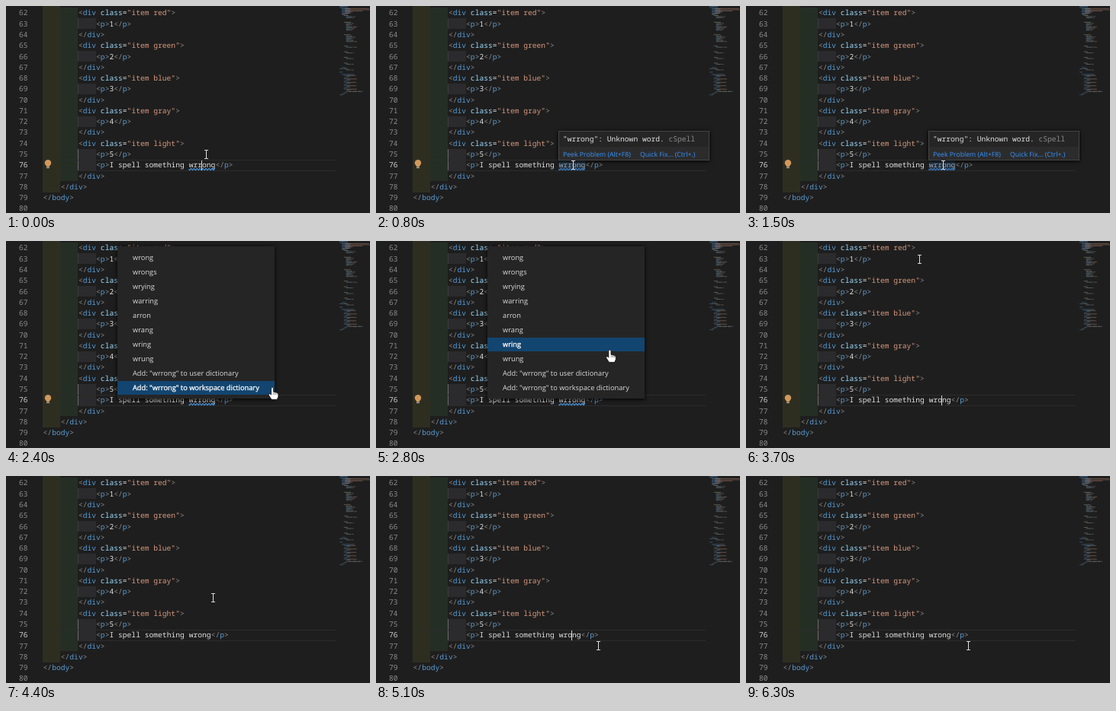
Animation of 477 by 272 pixels, one loop 6400 ms. Source, as an HTML page with a canvas:

```html
<!DOCTYPE html>
<html lang="en">
<head>
<meta charset="utf-8">
<title>Spell check quick fix</title>
<style>
  html, body { margin: 0; width: 100%; height: 100%; overflow: hidden; background: #1e1e1e; }
  canvas { display: block; }
</style>
</head>
<body>
<canvas width="477" height="272"></canvas>
<script>
const ctx = document.querySelector('canvas').getContext('2d');
const MONO = '500 9.65px "Noto Sans Mono", monospace';
const UI = '"Open Sans", "Noto Sans", sans-serif';
const LOOP = 6400, LEFT = 48.6, CHAR = 5.79, ROW = 14.28, FIRST = 62;
const HOVER_ON = 800, MENU_ON = 2200, FIXED = 3550, BULB_OFF = 4000;
const MENU = { x: 146, y: 7, w: 206, h: 200, top: 12.2, row: 19.05 };

const lines = ['red', 'green', 'blue', 'gray', 'light'].flatMap((name, i) => [
  `        <div class="item ${name}">`,
  `            <p>${i + 1}</p>`,
  '        </div>'
]);
lines.splice(14, 0, '');
lines.push('    </div>', '</body>', '');

const suggestions = ['wrong', 'wrongs', 'wrying', 'warring', 'arron', 'wrang', 'wring', 'wrung',
  'Add: "wrrong" to user dictionary', 'Add: "wrrong" to workspace dictionary'];

// time, x, y of the pointer
const path = [[0, 262, 195], [500, 258, 209], [1500, 258, 209], [1900, 375, 195], [2200, 375, 195],
  [2400, 349, 192], [2600, 349, 192], [3100, 228, 53], [3500, 227, 24], [3900, 227, 24],
  [4700, 291, 223], [LOOP, 291, 223]];

function pointerAt(t) {
  const i = path.findIndex(p => p[0] > t);
  const [t0, x0, y0] = path[i - 1], [t1, x1, y1] = path[i];
  const u = (t - t0) / (t1 - t0), e = u * u * (3 - 2 * u);
  return { x: x0 + (x1 - x0) * e, y: y0 + (y1 - y0) * e };
}

function rect(x, y, w, h, color) {
  ctx.fillStyle = color;
  ctx.fillRect(x, y, w, h);
}

function text(s, x, y, color, font = MONO) {
  ctx.font = font;
  ctx.fillStyle = color;
  ctx.fillText(s, x, y);
}

function eachToken(line, visit) {
  let inTag = false;
  for (const m of line.matchAll(/<\/?|>|"[^"]*"|=|\s+|[^<>"=\s]+/g)) {
    const s = m[0];
    if (s[0] === '<') inTag = true;
    const color = /^[<>]/.test(s) ? '#8a8a8a' : !inTag || s === '=' ? '#e0e0e0'
      : s[0] === '"' ? '#d6987e' : s === 'class' ? '#9cdcfe' : '#569cd6';
    if (s === '>') inTag = false;
    if (s.trim()) visit(s, m.index, color);
  }
}

function drawEditor(fixed) {
  rect(0, 0, 477, 272, '#1e1e1e');
  rect(48, 0, 23, 2, '#2e2e20');
  lines[14] = `            <p>I spell something ${fixed ? 'wrong' : 'wrrong'}</p>`;
  const tints = ['#2e2e20', '#252e25', '#2b2a2c'];
  lines.forEach((line, i) => {
    const y = 1.9 + i * ROW, top = Math.round(y), height = Math.round(y + ROW) - top;
    const depth = line.search(/\S|$/) / 4, current = i === 14;
    for (let d = 0; d < depth; d++) {
      const x = Math.floor(LEFT + d * 4 * CHAR);
      rect(x, top, d < 2 ? 23 : 24, height, tints[d]);
      if (d === 2) rect(x, top, 1, height, i > 12 ? '#686868' : '#3c3c3c');
    }
    if (current) {
      rect(49, top, 383, 1, '#2c2c2c');
      rect(49, top + height, 383, 1, '#2c2c2c');
    }
    text(FIRST + i, 17, y + 10.5, current ? '#d0d0d0' : '#8a8a8a');
    eachToken(line, (s, col, color) => text(s, LEFT + col * CHAR, y + 10.5, color));
  });
  if (!fixed) drawSquiggle(239.5, 274);
}

function drawSquiggle(from, to) {
  ctx.beginPath();
  for (let x = from; x <= to; x += 0.5) ctx.lineTo(x, 214.6 + Math.sin((x - from) * 1.6));
  ctx.strokeStyle = '#4a9ff0';
  ctx.lineWidth = 1.1;
  ctx.stroke();
}

function drawBulb() {
  ctx.beginPath();
  ctx.arc(55, 206.3, 4.2, 0, 7);
  ctx.fillStyle = '#d0985c';
  ctx.fill();
  rect(53, 209, 4, 2, '#d0985c');
  rect(53, 211.5, 4, 1.6, '#b0a89c');
}

function drawMinimap() {
  const bar = (line, col, length, color) =>
    rect(437 + col * 0.72, (line - 1) * 1.49, Math.min(length * 0.72, 40), 1, color);
  ctx.globalAlpha = 0.4;
  [15, 16, 60, 70, 48, 30, 24, 11].forEach((length, i) => {
    const col = i < 2 ? 0 : 4;
    bar(i + 1, col, Math.min(length, 16), '#569cd6');
    bar(i + 1, col + 6, length - 16, '#ce9178');
  });
  let n = 9;
  for (const props of [2, 7, 6, 1, 1, 1, 1, 1]) {
    bar(n++, 8, 6 + props, '#b8ae90');
    for (let k = 0; k < props; k++, n++) {
      const name = 5 + (n * 7) % 9;
      bar(n, 12, name, '#8cb4c8');
      bar(n, 13 + name, 2 + (n * 5) % 6, '#b09080');
    }
    n += 3;
  }
  bar(55, 4, 8, '#569cd6');
  bar(56, 0, 7, '#569cd6');
  bar(59, 0, 6, '#569cd6');
  bar(61, 4, 23, '#569cd6');
  lines.forEach((line, i) => eachToken(line, (s, col, color) => bar(FIRST + i, col, s.length, color)));
  ctx.globalAlpha = 1;
}

function panel(x, y, w, h) {
  ctx.shadowColor = '#000';
  ctx.shadowBlur = 5;
  ctx.shadowOffsetY = 1;
  rect(x, y, w, h, '#252526');
  ctx.shadowColor = 'transparent';
}

function drawHover() {
  rect(239.7, 203, 34.7, 13, 'rgba(38,79,120,.4)');
  panel(239, 164, 198, 39);
  rect(240, 185, 196, 17, '#2c2c2d');
  ctx.strokeStyle = '#454545';
  ctx.lineWidth = 1;
  ctx.strokeRect(239.5, 164.5, 197, 38);
  text('"wrrong": Unknown word.', 245, 178.3, '#e0e0e0');
  text('cSpell', 383.5, 178.3, '#8a8a8a');
  text('Peek Problem (Alt+F8)', 245, 198, '#3794ff', '8.7px ' + UI);
  text('Quick Fix... (Ctrl+.)', 346, 198, '#3794ff', '8.7px ' + UI);
}

function drawMenu(pointer) {
  const { x, y, w, h, top, row } = MENU;
  const inside = pointer.x < x + w;
  const selected = inside ? Math.max(0, Math.min(9, Math.floor((pointer.y - top) / row))) : 0;
  panel(x, y, w, h);
  rect(x, Math.round(top + selected * row), w, 18, '#124570');
  suggestions.forEach((s, i) => {
    const base = 25.3 + i * 19;
    text(s, 166, base, i === selected ? '#fff' : '#dadada', '9.27px ' + UI);
    if (i === selected) {
      ctx.strokeStyle = '#fff';
      ctx.lineWidth = 0.3;
      ctx.strokeText(s, 166, base);
    }
  });
}

function drawBeam({ x, y }) {
  x = Math.round(x);
  y = Math.round(y);
  rect(x, y - 6, 1, 12, '#e0e0e0');
  for (const dy of [-6, 5]) {
    rect(x - 2, y + dy, 2, 1, '#d0d0d0');
    rect(x + 1, y + dy, 2, 1, '#d0d0d0');
  }
}

const hand = new Path2D('M-1.5 1Q0-1 1.5 1V6L5 6.7Q7.5 7 7.5 9V12L6 15.5H-1L-4.5 10Q-5 8-3 8.3L-1.5 9.5Z');

function drawHand({ x, y }) {
  ctx.save();
  ctx.translate(x, y);
  ctx.scale(1.05, 1.05);
  ctx.fillStyle = '#fff';
  ctx.strokeStyle = '#111';
  ctx.lineWidth = 0.8;
  ctx.fill(hand);
  ctx.stroke(hand);
  ctx.beginPath();
  for (const fx of [1.7, 3.7, 5.7]) {
    ctx.moveTo(fx, 7);
    ctx.lineTo(fx, 9.5);
  }
  ctx.lineWidth = 0.5;
  ctx.stroke();
  ctx.restore();
}

function draw(t) {
  const pointer = pointerAt(t);
  const fixed = t >= FIXED, menu = t >= MENU_ON && !fixed, hover = t >= HOVER_ON && t < MENU_ON;
  drawEditor(fixed);
  if (t < BULB_OFF) drawBulb();
  drawMinimap();
  const blink = (fixed ? t - 3650 + 1000 : t) % 1000;
  if (!menu && blink < 500) rect(256, 203, 1, 13, '#d8d8d8');
  if (hover) drawHover();
  if (menu) drawMenu(pointer);
  const onLink = hover && pointer.x > 345 && pointer.y < 203;
  (menu || onLink ? drawHand : drawBeam)(pointer);
}

ctx.textRendering = 'geometricPrecision';
const start = performance.now();
function tick() {
  const t = (performance.now() - start) % LOOP;
  draw(Math.floor(t / 100) * 100);
  requestAnimationFrame(tick);
}
tick();
</script>
</body>
</html>
```
